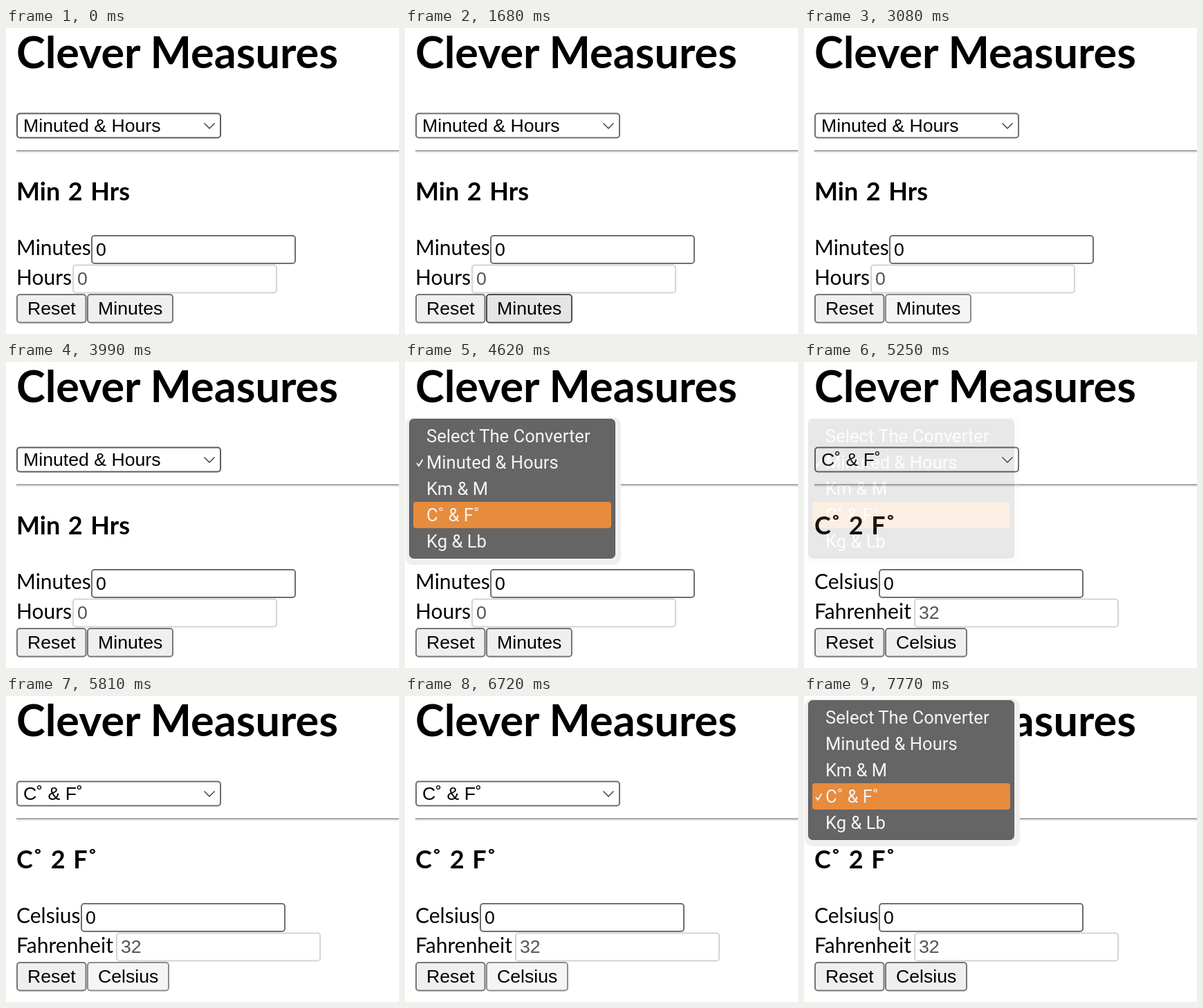
An HTML page that plays this animation: 568 px wide and 442 px high, repeating every 8000 ms.

```html
<!DOCTYPE html>
<html lang="en">
<head>
<meta charset="utf-8">
<title>Unit converter</title>
<style>
html, body { margin: 0; width: 100%; height: 100%; overflow: hidden; background: #fff; }
svg { display: block; width: 100%; height: 100%; }
text { white-space: pre; }
.label { font: 30px Lato, sans-serif; }
.title { font: 700 63px Lato, sans-serif; }
.head { font: 700 36px Lato, sans-serif; word-spacing: .08em; }
.ui { font: 26.67px "Liberation Sans", Arial, sans-serif; }
.menu { font: 25.6px Roboto, sans-serif; fill: #f4f4f4; }
</style>
</head>
<body>
<svg id="stage" viewBox="0 0 568 442"></svg>
<script>
const LOOP = 8000;
const stage = document.getElementById("stage");

const modes = [
  {
    name: "Minuted & Hours", head: "Min 2 Hrs",
    labels: ["Minutes", "Hours"], boxes: [123, 96], buttons: [125, 103],
    values: ["0", "0"], flipped: ["0", "0"]
  },
  {
    name: "C˚ & F˚", head: "C˚ 2 F˚",
    labels: ["Celsius", "Fahrenheit"], boxes: [108, 159], buttons: [119, 160],
    values: ["0", "32"], flipped: ["-17.77777777777778", "0"]
  }
];
const options = ["Select The Converter", "Minuted & Hours", "Km & M", "C˚ & F˚", "Kg & Lb"];

// [time, new values] in order; each entry changes only what it names
const events = [
  [0, { mode: 0, flip: false, button: "normal", select: "hover", menu: 0, checked: 1, pick: 1 }],
  [1400, { select: "normal" }],
  [1680, { button: "hover" }],
  [1960, { flip: true }],
  [2590, { button: "press" }],
  [2660, { button: "hover", flip: false }],
  [3080, { button: "press" }],
  [3220, { button: "hover", flip: true }],
  [3640, { button: "press" }],
  [3710, { button: "hover", flip: false }],
  [3920, { button: "normal" }],
  [3990, { select: "hover" }],
  [4270, { menu: 1 }],
  [4410, { pick: 2 }],
  [4620, { pick: 3 }],
  [4970, { menu: 0.96 }],
  [5040, { menu: 0.78 }],
  [5110, { menu: 0.56 }],
  [5180, { menu: 0.34 }],
  [5250, { menu: 0.14, mode: 1 }],
  [5320, { menu: 0, select: "normal" }],
  [5460, { button: "hover" }],
  [5810, { button: "press" }],
  [5880, { button: "hover", flip: true }],
  [6300, { button: "press" }],
  [6370, { button: "hover", flip: false }],
  [6720, { button: "press" }],
  [6860, { button: "hover", flip: true }],
  [7280, { button: "press" }],
  [7350, { button: "hover", flip: false }],
  [7490, { button: "normal" }],
  [7560, { select: "hover" }],
  [7770, { menu: 1, checked: 3 }]
];

const looks = {
  normal: ["#efefef", "#767676"],
  hover: ["#e5e5e5", "#4f4f4f"],
  press: ["#f5f5f5", "#8d8d8d"]
};

const escape = s => s.replace(/&/g, "&amp;");
const text = (x, y, s, cls, fill = "") =>
  `<text x="${x}" y="${y}" class="${cls}" ${fill && `fill="${fill}"`}>${escape(s)}</text>`;
const box = (x, y, w, h, fill, stroke) =>
  `<rect x="${x + 1}" y="${y + 1}" width="${w - 2}" height="${h - 2}" rx="4" fill="${fill}" stroke="${stroke}" stroke-width="2"/>`;

function field(mode, i, flip) {
  const y = 299 + 42.5 * i;
  const off = (i === 0) === flip;
  const value = (flip ? mode.flipped : mode.values)[i];
  return text(15, y + 29, mode.labels[i], "label") +
    box(mode.boxes[i], y, 296, 42, "#fff", off ? "#d4d4d4" : "#6e6e6e") +
    text(mode.boxes[i] + 7, y + 29.5, value, "ui", off ? "#545454" : "");
}

function button(x, w, label, look) {
  const [fill, stroke] = looks[look];
  return box(x, 384, w, 42.5, fill, stroke) + text(x + 16, 414, label, "ui");
}

// The checked row always lies over the select box.
function menu({ menu, checked, pick }) {
  const top = 120 - 38 * checked;
  const rows = options.map((o, i) => text(31, top + 34 + 38 * i, o, "menu")).join("");
  return `<g opacity="${menu}">
    <rect x="1" y="${top - 2}" width="311" height="213" rx="11" fill="#efefef"/>
    <rect x="6.5" y="${top + .5}" width="297" height="201" rx="6" fill="#656565" stroke="#5a5a5a"/>
    <rect x="12" y="${top + 6 + 38 * pick}" width="286" height="38" rx="4" fill="#e78b3d"/>
    <path d="M17 146l3 4l5.5 -9" fill="none" stroke="#f4f4f4" stroke-width="2"/>
    ${rows}</g>`;
}

function stateAt(t) {
  const s = {};
  for (const [at, change] of events) if (t >= at) Object.assign(s, change);
  return s;
}

function draw(s) {
  const mode = modes[s.mode];
  const side = s.flip ? 1 : 0;
  stage.innerHTML =
    text(15, 58, "Clever Measures", "title") +
    box(15, 122.5, 296, 37, "#fff", s.select === "hover" ? "#5c5c5c" : "#6e6e6e") +
    text(25, 150, mode.name, "ui") +
    '<path d="M286.5 137.5l7.5 7.5l7.5 -7.5" fill="none" stroke="#333" stroke-width="1.3"/>' +
    '<path d="M15 177.5H568" stroke="#939393" stroke-width="2"/>' +
    '<path d="M15 179.5H568" stroke="#ededed" stroke-width="2"/>' +
    text(15, 249, mode.head, "head") +
    field(mode, 0, s.flip) + field(mode, 1, s.flip) +
    button(15, 101.5, "Reset", "normal") +
    button(117, mode.buttons[side], mode.labels[side], s.button) +
    (s.menu ? menu(s) : "");
}

let last = "";
function tick() {
  const s = stateAt(performance.now() % LOOP);
  const key = JSON.stringify(s);
  if (key !== last) draw(s);
  last = key;
  requestAnimationFrame(tick);
}
tick();
</script>
</body>
</html>
```
